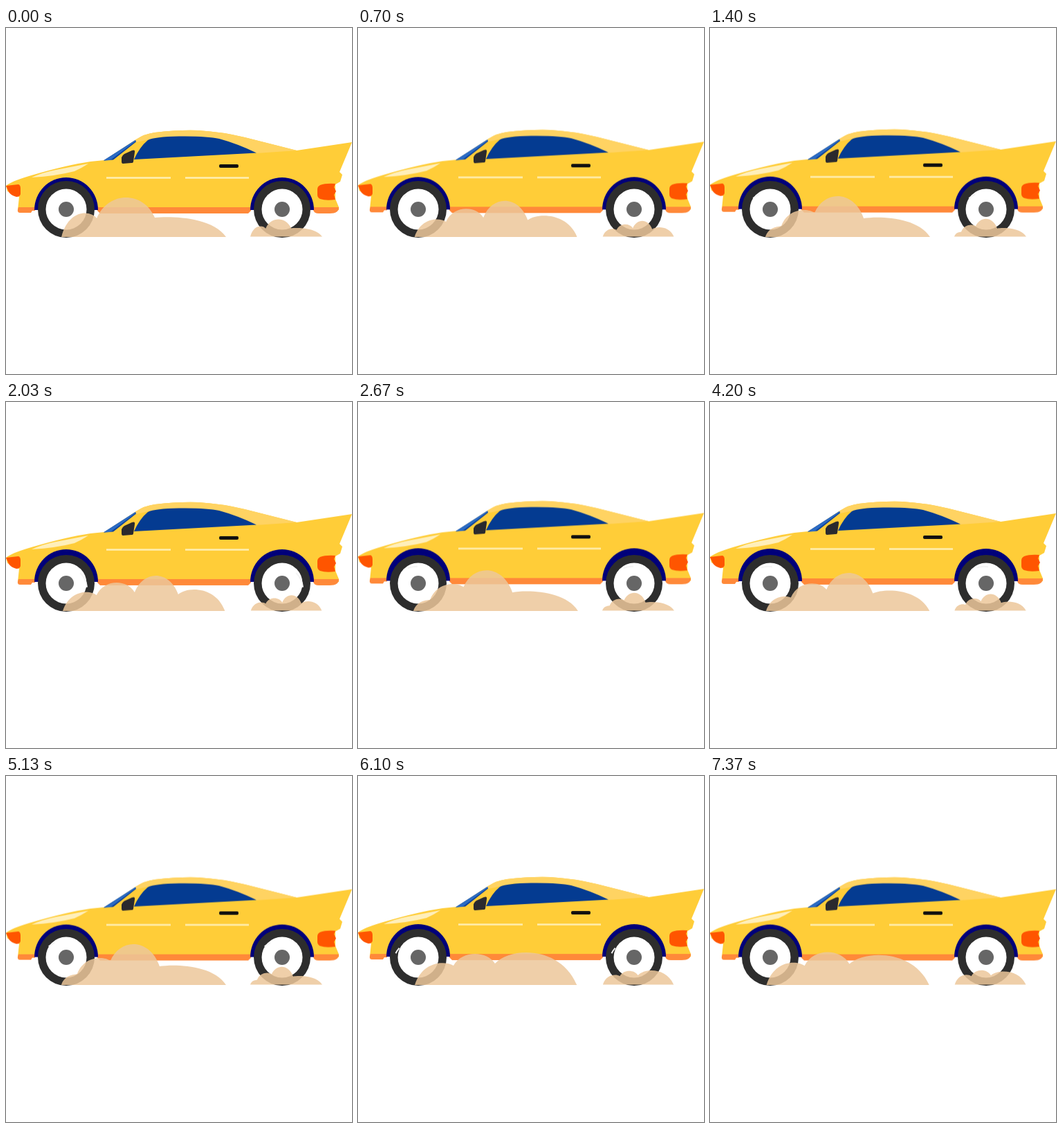
Write an HTML page that moves like this. It is 500x500 px and loops after 7410 ms.

```html
<!DOCTYPE html>
<html lang="en">
<head>
<meta charset="utf-8">
<title>Yellow car</title>
<style>
  html, body { margin: 0; height: 100%; overflow: hidden; background: #fff; }
  svg { display: block; width: 100vw; height: 100vh; }

  .body { animation: bob 373.33ms linear infinite alternate; }
  @keyframes bob {
    from { transform: translateY(0); }
    to { transform: translateY(-5.5px); }
  }

  .shine {
    fill: none; stroke: #f4f4f4; stroke-width: 2;
    animation: sweep 1244.44ms linear infinite;
  }
  /* A glint sweeps over the tyre and back, twice per cycle. */
  @keyframes sweep {
    0%, 6% { stroke-dasharray: 0 400; stroke-dashoffset: 0; }
    12.5% { stroke-dasharray: 22 400; stroke-dashoffset: -26; }
    20% { stroke-dasharray: 49 400; stroke-dashoffset: -110; }
    26%, 29% { stroke-dasharray: 0 400; stroke-dashoffset: -196; }
    36% { stroke-dasharray: 49 400; stroke-dashoffset: -80; }
    41%, 54% { stroke-dasharray: 0 400; stroke-dashoffset: 0; }
    63.4% { stroke-dasharray: 49 400; stroke-dashoffset: -132; }
    65.2% { stroke-dasharray: 26 400; stroke-dashoffset: -170; }
    67%, 78% { stroke-dasharray: 0 400; stroke-dashoffset: -196; }
    84% { stroke-dasharray: 49 400; stroke-dashoffset: -90; }
    90.2% { stroke-dasharray: 20 400; stroke-dashoffset: 0; }
    91.8%, 100% { stroke-dasharray: 0 400; stroke-dashoffset: 0; }
  }

  .dust { fill: #edc79a; fill-opacity: .85; }
</style>
</head>
<body>
<svg viewBox="0 0 500 500">
  <defs>
    <g id="wheel">
      <circle r="41" fill="#2d2d2d"/>
      <circle r="29.5" fill="#fff"/>
      <circle r="11" fill="#666"/>
    </g>
    <path id="arch" d="M-46 1A46 47 0 0 1 46 1Z" fill="#00007a"/>
  </defs>

  <g class="body">
    <path fill="#ffcd38" d="M0 228Q8 221 40 212Q88 198 122 193L142 191L188 161Q200 153 215 151Q250 147 278 148Q312 150 345 158L420 177L500 165L482 208L486 212L483 222L476 226V247L481 259V263H17L19 244L2 236Z"/>
    <path fill="#ffd362" d="M184 166L188 161Q200 153 215 151Q250 147 278 148Q312 150 345 158L420 177L362 181L305 160L225 157Z"/>
    <g fill="#ff8939">
      <path d="M18 259H42V264H38L36 267H20Q15 267 18 259Z"/>
      <path d="M132 259H354V264L350 268H136L132 264Z"/>
      <path d="M444 259H481Q481 268 468 268H452Q445 268 444 263Z"/>
    </g>
    <path fill="#ffefba" d="M37 216Q52 209 72 205L119 196Q110 202 99 207Q72 214 37 216Z"/>
    <path fill="#043b91" d="M185 190Q193 172 205 162Q215 157 250 156.500Q290 156 308 160Q334 167 362 180.500Z"/>
    <path fill="#0b409b" d="M141 191.500L187 162L188 164.500Q171 178 155 190.500Z"/>
    <path fill="#2b6bc4" d="M141 191.500L187 162L187.500 163.500L151 191Z"/>
    <path fill="#2a2a2e" d="M167 193V187Q168 184 171 182L182 177Q187 175 186 180L184 193Q184 195 181 195L169 196Q167 196 167 193Z"/>
    <rect x="308" y="197" width="28" height="5" rx="2" fill="#101010"/>
    <path d="M145 216.500H238M259 216.500H351" stroke="#fff0b3" stroke-width="2.500"/>
    <path fill="#ff5500" d="M0 228L18 226Q21 227 21 232V240Q20 244 15 244Q7 242 4 237Z"/>
    <path fill="#ff5500" d="M454 227Q462 224 476 225L474 230L477 236L474 241L476 248Q462 250 454 247Q450 245 450 241V233Q450 229 454 227Z"/>
    <use href="#arch" x="87" y="262"/>
    <use href="#arch" x="399" y="262"/>
  </g>

  <use href="#wheel" x="87" y="262"/>
  <use href="#wheel" x="399" y="262"/>
  <path class="shine" pathLength="196" transform="translate(87 262)" d="M-32.500 -5.730A33 33 0 0 1 29.660 14.470"/>
  <path class="shine" pathLength="196" transform="translate(399 262)" d="M-32.500 -5.730A33 33 0 0 1 29.660 14.470"/>

  <path class="dust"/>
  <g transform="translate(318 169.500) scale(.437)"><path class="dust"/></g>
</svg>
<script>
  const LOOP = 7410;
  const CYCLE = 1244.44;

  // Each puff: [middle y, right x, right y]. Puffs move one slot per cycle.
  const poses = [
    { at: 0, x: 82, puffs: [[302, 82, 302], [276, 131, 279], [261, 186, 275], [251, 249, 278], [272, 316, 301]] },
    { at: .27, x: 82, puffs: [[302, 82, 302], [272, 138, 274], [257, 198, 271], [256, 316, 301], [301, 316, 301]] },
    { at: .366, x: 80, puffs: [[302, 80, 302], [269, 131, 275], [245, 215, 274], [276, 318, 302], [302, 318, 302]] },
    { at: .49, x: 80, puffs: [[289, 103, 286], [264, 151, 267], [243, 222, 275], [276, 318, 302], [302, 318, 302]] },
    { at: 1, x: 82, puffs: [[276, 131, 279], [261, 186, 275], [251, 249, 278], [272, 316, 301], [301, 316, 301]] }
  ];

  function outline({ x, puffs }) {
    let d = `M${x} 302`, y = 302;
    for (const [mid, nx, ny] of puffs) {
      const w = (nx - x) * .2;
      const top = (mid - (y + ny) / 8) * 4 / 3;
      d += `C${x + w} ${top} ${nx - w} ${top} ${nx} ${ny}`;
      x = nx;
      y = ny;
    }
    return d + "V302Z";
  }

  const frames = poses.map(p => ({ offset: p.at, d: `path("${outline(p)}")` }));
  for (const el of document.querySelectorAll(".dust")) {
    el.animate(frames, { duration: CYCLE, delay: -.366 * CYCLE, iterations: Infinity });
  }

  const motions = document.getAnimations();
  motions.forEach(m => m.pause());

  function tick() {
    const t = performance.now() % LOOP;
    motions.forEach(m => { m.currentTime = t; });
    requestAnimationFrame(tick);
  }
  tick();
</script>
</body>
</html>
```
